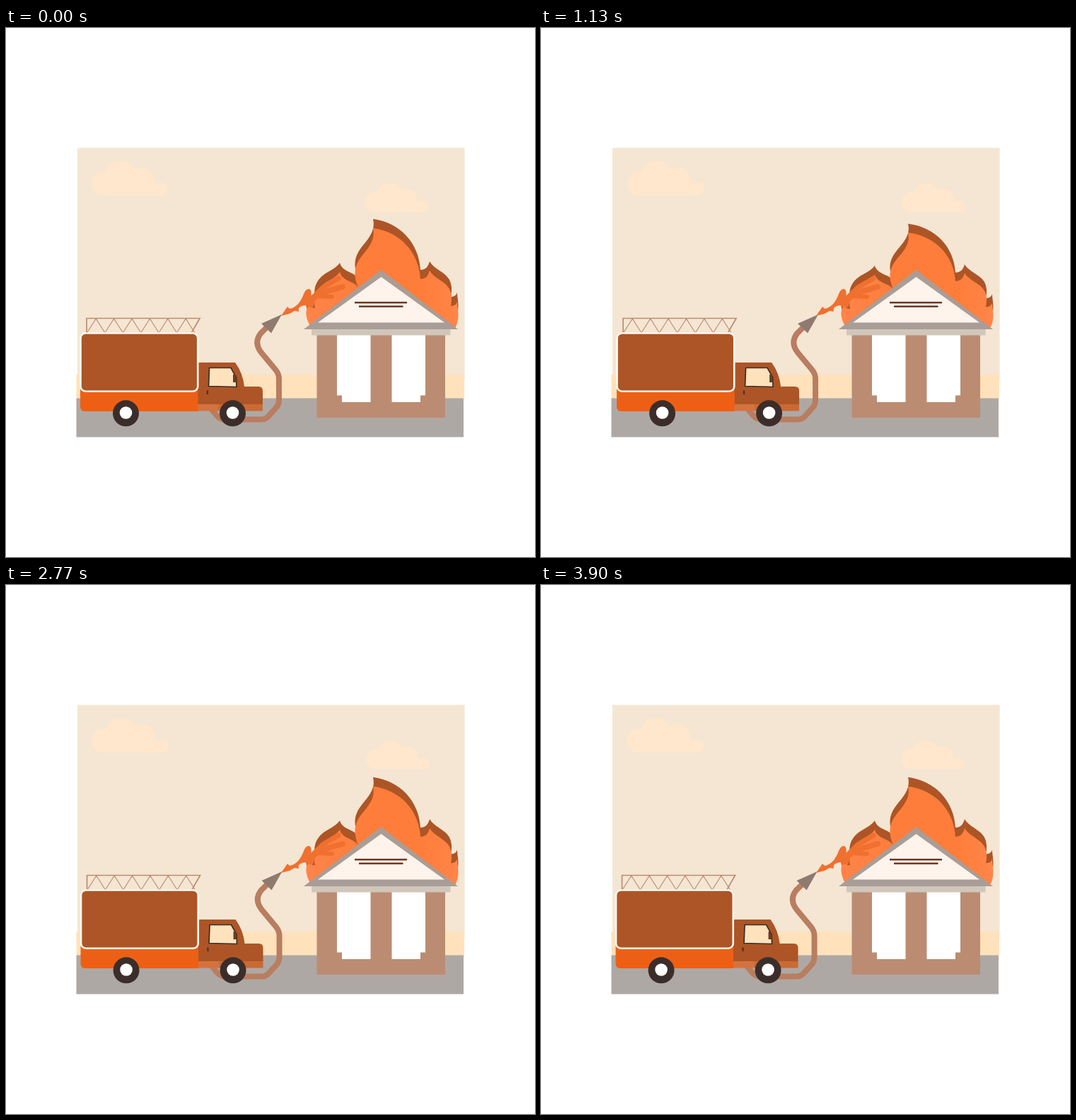
An HTML page with a canvas that plays this animation: 748 px wide and 748 px high, repeating every 3.93 s.

```html
<!DOCTYPE html>
<html lang="en">
<head>
<meta charset="utf-8">
<title>Fire engine</title>
<style>
  html, body { margin: 0; width: 100%; height: 100%; overflow: hidden; background: #fff; }
  canvas { display: block; width: 748px; height: 748px; }
</style>
</head>
<body>
<canvas id="stage" width="748" height="748"></canvas>
<script>
const ctx = document.getElementById('stage').getContext('2d');
const LOOP = 3930, STEP = 100 / 3, STEPS = 118, CYCLE = 40;
const BASE = 425; // flames shrink towards this line

const C = {
  sky: '#f4e6d3', cloud: '#fee7cc', band: '#ffe2bb', road: '#aea8a5',
  wall: '#bc8c72', rust: '#ad5526', orange: '#ee5f14', dark: '#3b2e2a',
  hose: '#b97d60', splash: '#f0702f'
};

const blazePath = new Path2D(
  'M432 425 C426 415 423 405 425 398 Q427 394 427 388 Q430 396 437 396' +
  'C434 378 440 366 457 357 Q468 351 472 345 C475 358 493 358 498 367' +
  'C490 346 493 335 505 320 C517 306 522 296 519 283' +
  'C557 288 584 317 586 355 C594 355 597 350 599 343' +
  'C605 354 621 358 627 369 Q632 379 629 393 Q636 393 638 387' +
  'C638 398 643 408 635 425 Z');

const splashPath = new Path2D(
  'M389 407 L398 394 L401 397 C412 395 417 386 421 376' +
  'Q424 368 429 369 Q433 371 431 381 L440 374 L440 384' +
  'C434 385 437 394 433 395 C427 396 425 390 419 393' +
  'Q412 395 414 401 L408 400 L401 404 Z');

const hosePath = new Path2D(
  'M288 536 L298 548 Q303 553.5 310 553.5 H361 Q367 553.5 371 549' +
  'L381 538 Q386 533 386 526 V496 Q386 489 381 483 L361 459' +
  'Q350 445 360 432 L369 423');

const cabPath = new Path2D(
  'M271 473 H324 Q335 488 337 507 H357 Q363 507 363 513 V532 H271 Z');

function rect(x, y, x2, y2, color) {
  ctx.fillStyle = color;
  ctx.fillRect(x, y, x2 - x, y2 - y);
}

function trace(points, closed) {
  ctx.beginPath();
  points.forEach(([x, y]) => ctx.lineTo(x, y));
  if (closed) ctx.closePath();
}

function poly(points, color) {
  trace(points, true);
  ctx.fillStyle = color;
  ctx.fill();
}

function line(points, color, width, closed) {
  trace(points, closed);
  ctx.strokeStyle = color;
  ctx.lineWidth = width;
  ctx.stroke();
}

function disc(x, y, r, color) {
  ctx.beginPath();
  ctx.arc(x, y, r, 0, Math.PI * 2);
  ctx.fillStyle = color;
  ctx.fill();
}

function round(x, y, x2, y2, r) {
  ctx.beginPath();
  ctx.roundRect(x, y, x2 - x, y2 - y, r);
}

function shifted(x, y, draw) {
  ctx.save();
  ctx.translate(x, y);
  draw();
  ctx.restore();
}

function backdrop() {
  rect(0, 0, 748, 748, '#fff');
  rect(101, 169.5, 648.5, 499, C.sky);
  rect(99.5, 490, 648, 524, C.band);
  rect(99.5, 523.5, 647, 578.5, C.road);
}

// Origin at the cloud's lower left corner
function cloud(x, y, size) {
  shifted(x, y, () => {
    ctx.scale(size, size);
    disc(17, -17, 17, C.cloud);
    disc(42, -25, 24, C.cloud);
    disc(70, -20, 20, C.cloud);
    disc(99.5, -9.5, 9.5, C.cloud);
    rect(17, -18, 99, 0, C.cloud);
  });
}

function blaze(k) {
  shifted(0, BASE, () => {
    ctx.scale(1, 1 - 0.213 * k);
    ctx.translate(0, -BASE);
    shifted(0, -13, () => {
      ctx.fillStyle = C.rust;
      ctx.fill(blazePath);
    });
    const heat = ctx.createLinearGradient(425, 0, 640, 0);
    heat.addColorStop(0, '#ff844a');
    heat.addColorStop(0.35, '#ff7d3a');
    heat.addColorStop(0.75, '#ff7d3a');
    heat.addColorStop(1, '#ff8549');
    ctx.fillStyle = heat;
    ctx.fill(blazePath);
  });
}

function splash() {
  ctx.fillStyle = C.splash;
  ctx.fill(splashPath);
  ctx.lineCap = 'round';
  line([[433, 382], [448, 367], [470, 354]], C.splash, 7);
  line([[438, 379], [455, 372], [476, 366]], C.splash, 8);
  line([[437, 379], [461, 380]], C.splash, 6);
  ctx.lineCap = 'butt';
}

function house() {
  rect(439.5, 430, 621, 551, C.wall);
  poly([[468, 434], [515.5, 434], [515.5, 529], [475, 529], [475, 519.5], [468, 519.5]], '#fff');
  poly([[545.5, 434], [593, 434], [593, 519.5], [586, 519.5], [586, 529], [545.5, 529]], '#fff');
  rect(432, 425, 628.5, 434.5, '#d1c6ba');
  poly([[530.5, 342], [639, 426], [421, 426]], '#a99d97');
  poly([[530.5, 352], [620, 416.5], [441, 416.5]], '#fff4ec');
  rect(493, 387, 567, 389.5, '#6e3a26');
  rect(499, 392.5, 561.5, 395, '#6e3a26');
}

function ladder() {
  const rungs = [[114.5, 431]];
  for (let i = 0; i < 6; i++) {
    const x = 114.5 + i * 25.4;
    rungs.push([x + 12.7, 411], [x + 25.4, 431]);
  }
  line(rungs, C.wall, 1.2);
  line([[114, 410.5], [274, 410.5], [262, 431.5], [114, 431.5]], C.wall, 1.7, true);
}

function wheel(x) {
  disc(x, 544.8, 18.5, C.dark);
  disc(x, 544, 8.8, '#fff');
}

function truck() {
  ctx.strokeStyle = C.hose;
  ctx.lineWidth = 8;
  ctx.stroke(hosePath);
  poly([[361, 418], [390, 405], [375, 431.5]], '#8f7a70');

  ladder();
  rect(271, 531, 300, 541.5, '#d4733f');
  rect(300, 531, 363, 541.5, '#c96a35');
  ctx.fillStyle = C.rust;
  ctx.fill(cabPath);

  round(105, 505, 271.5, 542, [0, 0, 0, 6]);
  ctx.fillStyle = C.orange;
  ctx.fill();
  rect(105, 523.5, 271.5, 524.5, '#d9682c');

  round(105.5, 431.5, 271.2, 513.7, 7);
  ctx.fillStyle = C.rust;
  ctx.fill();
  ctx.strokeStyle = '#fff8f0';
  ctx.lineWidth = 2.6;
  ctx.stroke();

  const pane = [[287.5, 480.5], [318, 480.5], [325.5, 494], [326, 507.5], [286.5, 506.5]];
  poly(pane, '#fde2bc');
  line(pane, C.dark, 1.7, true);
  poly([[321, 490], [324, 490], [326, 501], [321, 501]], '#6b3a22');
  rect(283.8, 512.5, 286, 518, '#5a2c18');

  wheel(169.5);
  wheel(320.5);
}

function draw(t) {
  const step = Math.min(STEPS - 1, Math.floor((t + 5) / STEP));
  const k = (1 - Math.cos(step / CYCLE * Math.PI * 2)) / 2;
  const drift = k * (step < 2 * CYCLE ? 10 : 19.5); // last sway is wider

  backdrop();
  cloud(120 + drift, 237, 1);
  cloud(508 + drift, 260, 0.82);
  blaze(k);
  shifted(10 * k, 0, truck);
  splash();
  house();
}

const start = performance.now();
function tick() {
  draw((performance.now() - start) % LOOP);
  requestAnimationFrame(tick);
}
tick();
</script>
</body>
</html>
```
